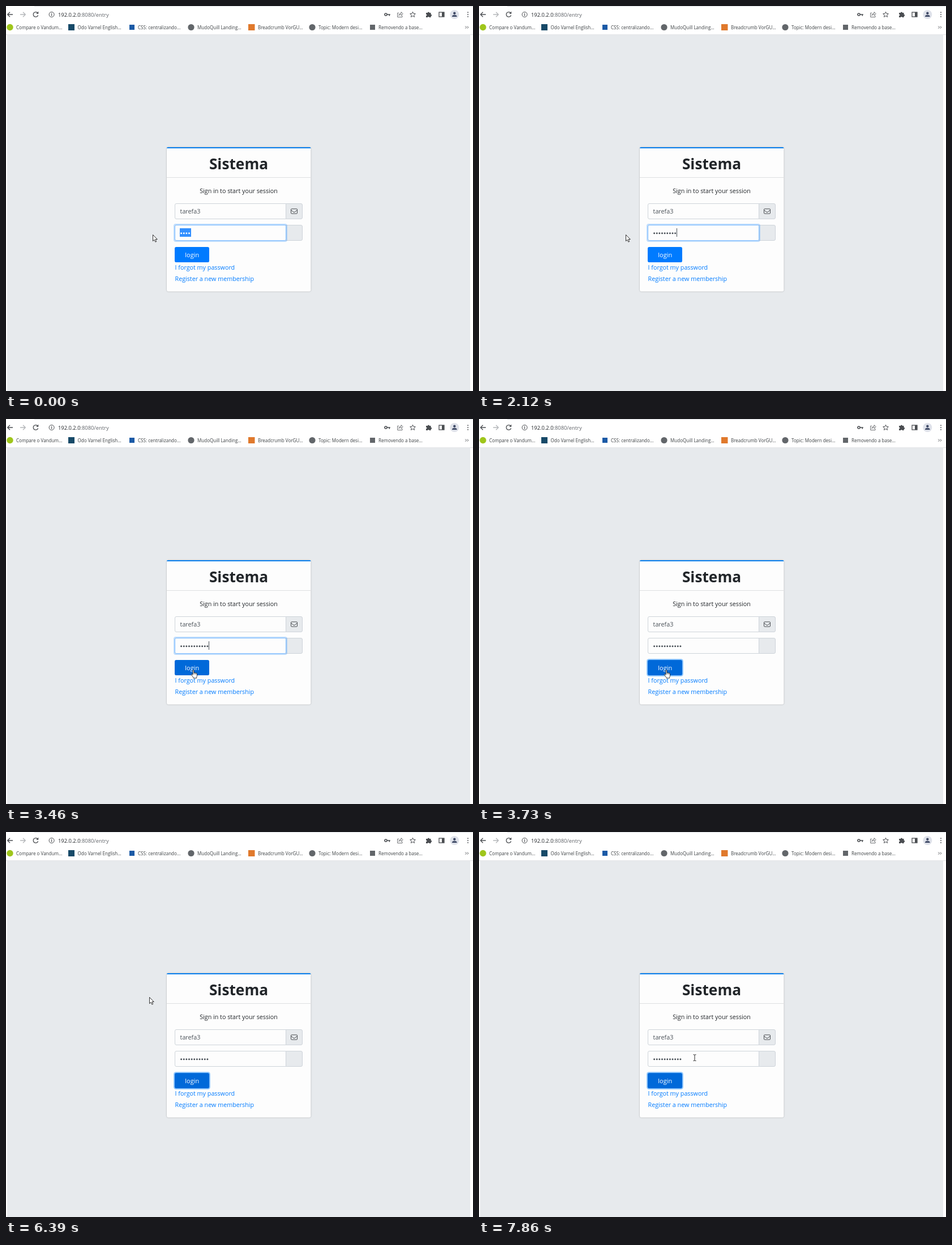
These frames come from a looping animation (825x679 px, 8000 ms). An HTML page:

```html
<!DOCTYPE html>
<html lang="en">
<head>
<meta charset="utf-8">
<title>Sign in</title>
<style>
html, body { margin: 0; width: 100%; height: 100%; overflow: hidden; background: #fff; }
svg { display: block; position: absolute; left: 0; top: 0; }
text { font: 10.74px "Open Sans", "Noto Sans", sans-serif; fill: #212529; }
.url { font-size: 9.35px; }
.bookmarks text { font-size: 8.05px; fill: #3c4043; }
.title { font-size: 26.3px; font-weight: 700; }
.value { fill: #495057; }
.link { fill: #007bff; }
.button-label { font-size: 11px; fill: #fff; }
.middle { text-anchor: middle; }
.icon { fill: none; stroke: #4a4d51; stroke-width: 1.3; }
.icon .thin, .icon.thin { stroke-width: 1; }
.icon .faded { stroke: #b4b6b9; }
.solid { fill: #4a4d51; }
.field { fill: #fdfdfd; stroke: #ced4da; }
.addon { fill: #e7eaed; stroke: #ced4da; }
.card { filter: drop-shadow(0 .7px .9px rgba(0, 0, 0, .28)); }

/* Every change is a hard cut on one shared 8 s clock. */
.password, .input-focus, .button-face, .button-ring, .pointer, .arrow, .hand, .beam {
  animation: 8s step-end infinite;
}
.password {
  --pitch: 4.63px;
  position: absolute; left: 307px; top: 392px; height: 15px;
  overflow: hidden; border-right: 1px solid transparent;
  animation-name: type;
}
.password line { stroke: currentColor; stroke-width: 3; stroke-linecap: round; stroke-dasharray: 0 4.63; }
.input-focus { animation-name: input-focus; }
.button-face { animation-name: button-face; }
.button-ring { animation-name: button-ring; }
.pointer { animation-name: move; }
.arrow { animation-name: arrow; }
.hand { animation-name: hand; }
.beam { animation-name: beam; }

@keyframes type {
  0% { width: calc(4 * var(--pitch)); color: #fff; background: #3390ff; border-color: transparent; }
  6.625% { width: var(--pitch); color: #495057; background: transparent; border-color: #495057; }
  8.5% { width: calc(2 * var(--pitch)); color: #495057; background: transparent; border-color: #495057; }
  10% { width: calc(4 * var(--pitch)); }
  13.375% { width: calc(5 * var(--pitch)); }
  14.875% { width: calc(7 * var(--pitch)); }
  20.25% { width: calc(8 * var(--pitch)); }
  26.5% { width: calc(9 * var(--pitch)); }
  28.375% { width: calc(10 * var(--pitch)); }
  29.875% { width: calc(11 * var(--pitch)); }
  36.5% { border-color: transparent; }
  43.25% { border-color: #495057; }
  45.125%, 100% {
    width: calc(11 * var(--pitch)); color: #495057;
    background: transparent; border-color: transparent;
  }
}
@keyframes input-focus {
  0% { opacity: 1; }
  45.125% { opacity: .4; }
  46.625%, 100% { opacity: 0; }
}
@keyframes button-face {
  0% { fill: #007bff; }
  41.75%, 100% { fill: #0069d9; }
}
@keyframes button-ring {
  0% { opacity: 0; }
  45.125% { opacity: .7; }
  46.625%, 100% { opacity: 1; }
}
@keyframes move {
  0% { transform: translate(259px, 403px); }
  38.375% { transform: translate(438px, 449px); }
  39.875% { transform: translate(394px, 449px); }
  41.75% { transform: translate(345px, 444px); }
  43.25% { transform: translate(327px, 442px); }
  72.75% { transform: translate(305px, 346px); }
  74.625% { transform: translate(232px, 228px); }
  76.5% { transform: translate(195px, 208px); }
  78.375% { transform: translate(164px, 245px); }
  79.875% { transform: translate(253px, 291px); }
  81.75% { transform: translate(183px, 222px); }
  83.625% { transform: translate(220px, 207px); }
  85.125% { transform: translate(291px, 290px); }
  86.625% { transform: translate(240px, 364px); }
  88.125% { transform: translate(269px, 258px); }
  90% { transform: translate(235px, 401px); }
  91.875% { transform: translate(150px, 370px); }
  93.375% { transform: translate(110px, 267px); }
  95.25% { transform: translate(200px, 224px); }
  96.75% { transform: translate(300px, 260px); }
  98.25%, 100% { transform: translate(377px, 392px); }
}
@keyframes arrow {
  0%, 72.75% { visibility: visible; }
  41.75%, 98.25%, 100% { visibility: hidden; }
}
@keyframes hand {
  0%, 72.75%, 100% { visibility: hidden; }
  41.75% { visibility: visible; }
}
@keyframes beam {
  0% { visibility: hidden; }
  98.25%, 100% { visibility: visible; }
}
</style>
</head>
<body>
<svg width="825" height="679" viewBox="0 0 825 679">
  <rect width="825" height="679" fill="#fff"/>
  <rect x="50" width="775" height="1" fill="#dee1e6"/>
  <rect x="2" y="51" width="818" height="628" fill="#e7eaed"/>
  <rect y="50" width="825" height="1" fill="#e3e5e8"/>

  <!-- toolbar -->
  <g class="icon">
    <path d="M12 15H3M7 10.7 2.7 15 7 19.3"/>
    <path class="faded" d="M25 15h9M30 10.7 34.3 15 30 19.3"/>
    <path d="M56 12.4A4.3 4.3 0 1 0 56.6 16.2"/>
    <circle class="thin" cx="80.6" cy="15" r="4.5"/>
    <path d="M80.6 14.3v3.2M80.6 12.2v1.2"/>
    <circle cx="671" cy="15" r="2" stroke-width="1.6"/>
    <path stroke-width="1.6" d="M673 15h5.8M677.3 15v2.6"/>
    <path class="thin" d="M694 12.3h-2.3v7.2h8.3v-2.6M694 16.8c.4-2.7 2-4 4.2-4v-2.2l3 3.2-3 3.1v-2.1c-2 0-3.2.6-4.2 2z" stroke-opacity=".8"/>
    <path class="thin" d="m718.5 10.2 1.4 3.2 3.4.3-2.6 2.3.8 3.4-3-1.8-3 1.8.8-3.4-2.6-2.3 3.4-.3z"/>
    <rect x="765" y="11" width="9" height="8"/>
  </g>
  <path class="solid" d="M53.2 13.7h4.1V9.6zM770 11h4v8h-4zM742 12h2.8a1.6 1.6 0 0 1 3.2 0h2.6v2.7a1.6 1.6 0 0 1 0 3.2V20h-2.8a1.5 1.5 0 0 0-2.9 0H742v-2.7a1.4 1.4 0 0 0 0-2.8z"/>
  <circle cx="792.3" cy="15" r="8" fill="#dfe2ea"/>
  <g fill="#3f4a66">
    <circle cx="792.3" cy="12.8" r="2.2"/>
    <path d="M788 19v-.8c0-3.3 8.6-3.3 8.6 0v.8z"/>
  </g>
  <path d="M816 11.3v.01M816 15v.01M816 18.7v.01" stroke="#4a4d51" stroke-width="1.9" stroke-linecap="round"/>
  <text class="url" x="92" y="18.5">192.0.2.0<tspan fill="#5f6368">:8080/entry</tspan></text>

  <!-- bookmarks -->
  <g class="bookmarks">
    <circle cx="7" cy="37.5" r="5.7" fill="#9fc61b"/>
    <text x="18" y="40.6">Compare o Vandum...</text>
    <rect x="110" y="32" width="11" height="11" fill="#174a68"/>
    <text x="126.5" y="40.6">Odo Varnel English...</text>
    <rect x="218" y="33" width="9" height="9" fill="#1b5aa6"/>
    <text x="233" y="40.6">CSS: centralizando...</text>
    <circle cx="327" cy="37.5" r="5.6" fill="#62666a"/>
    <text x="338" y="40.6">MudoQuill Landing...</text>
    <rect x="428" y="32" width="11.5" height="11" fill="#e0792c"/>
    <text x="445" y="40.6">Breadcrumb VorGU...</text>
    <circle cx="541" cy="37.5" r="5.6" fill="#62666a"/>
    <text x="552" y="40.6">Topic: Modern desi...</text>
    <rect x="643" y="33" width="9" height="9" fill="#62666a"/>
    <text x="658" y="40.6">Removendo a base...</text>
    <path class="icon thin" d="m811.5 35.6 2 2-2 2m3.3-4 2 2-2 2"/>
  </g>

  <!-- card -->
  <g class="card">
    <rect x="284" y="249" width="254.5" height="254.5" rx="3" fill="#fdfdfd"/>
  </g>
  <path d="M284 251a2 2 0 0 1 2-2h250.5a2 2 0 0 1 2 2z" fill="#0a80ee"/>
  <path d="M284 302.5h254.5" stroke="#dedfe0"/>
  <text class="title middle" x="411" y="288">Sistema</text>
  <text class="middle" x="411" y="330">Sign in to start your session</text>

  <path class="addon" d="M494.5 348.5h26.5a2.5 2.5 0 0 1 2.5 2.5v22a2.5 2.5 0 0 1-2.5 2.5h-26.5z"/>
  <path class="field" d="M494.5 348.5v27H301a2.5 2.5 0 0 1-2.5-2.5v-22a2.5 2.5 0 0 1 2.5-2.5z"/>
  <text class="value" x="307.6" y="366">tarefa3</text>
  <g class="icon thin">
    <rect x="503.5" y="357.8" width="11" height="8.4" rx="1.2"/>
    <path d="m503.8 360.2 4.2 3.2q1 .7 2 0l4.2-3.2"/>
  </g>

  <path class="addon" d="M494.5 386.5h26.5a2.5 2.5 0 0 1 2.5 2.5v22a2.5 2.5 0 0 1-2.5 2.5h-26.5z"/>
  <path class="field" d="M494.5 386.5v27H301a2.5 2.5 0 0 1-2.5-2.5v-22a2.5 2.5 0 0 1 2.5-2.5z"/>
  <g class="input-focus" fill="none">
    <rect x="297" y="385" width="199" height="30" rx="3" stroke="#007bff" stroke-opacity=".25" stroke-width="2"/>
    <rect x="298.5" y="386.5" width="196" height="27" rx="2" stroke="#80bdff"/>
  </g>

  <rect class="button-ring" x="296" y="423" width="65" height="31" rx="4.5" fill="#92c8fd"/>
  <rect class="button-face" x="298" y="425" width="61" height="27" rx="2.8"/>
  <text class="button-label middle" x="328.8" y="442.7">login</text>
  <text class="link" x="298.5" y="465">I forgot my password</text>
  <text class="link" x="298.5" y="485">Register a new membership</text>
</svg>

<div class="password">
  <svg width="60" height="15"><line x1="2.6" y1="8.7" x2="49.2" y2="8.7"/></svg>
</div>

<svg width="825" height="679" viewBox="0 0 825 679">
  <g class="pointer">
    <path class="arrow" d="M.5.5v11.1l2.6-2.4 1.8 4 1.8-.8-1.7-3.9h3.3z" fill="#fff" stroke="#1c1c1c" stroke-width=".9"/>
    <g class="hand" fill="#fff" stroke="#1c1c1c" stroke-width=".9" stroke-linejoin="round">
      <path d="M3 9.2V1.8c0-1.6 2-1.6 2 0v4c.3-.9 1.8-.8 1.9.3.4-.8 1.8-.6 1.9.5.5-.6 1.7-.3 1.7.9v3.3c0 1.4-1 2.1-1 4.2H4.2c0-1.6-2.3-3.5-3.5-5.6-.6-1.2.7-2 1.5-1z"/>
      <path d="M5 5.8v2.6M6.9 6.1v2.4M8.8 6.6v2.1" stroke-width=".6"/>
    </g>
    <path class="beam" d="M1.5.7H3l1 .8 1-.8h1.5M4 1.5v9.2M1.5 11.5H3l1-.8 1 .8h1.5" fill="none" stroke="#2a2a2a"/>
  </g>
</svg>
</body>
</html>
```
